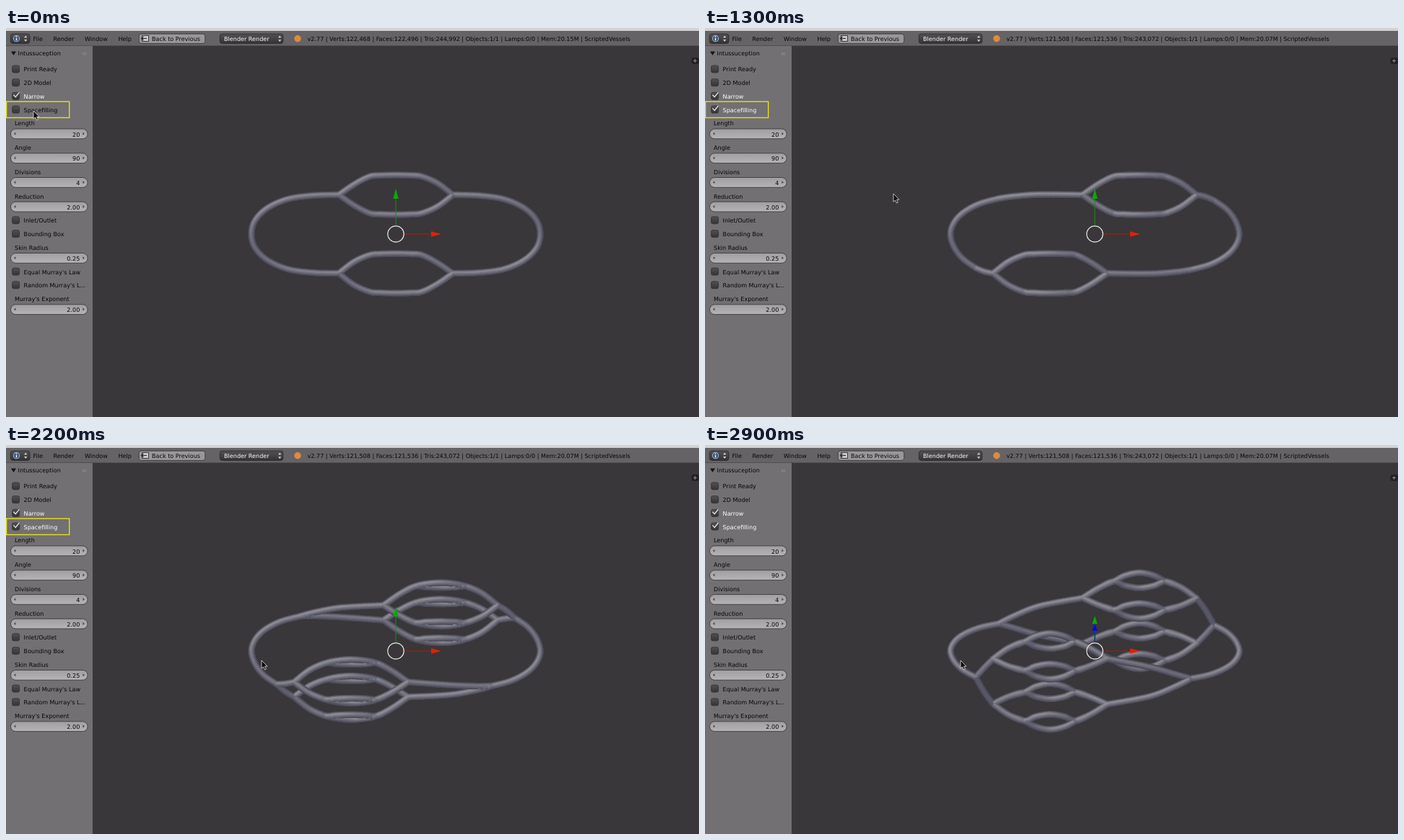
These frames come from a looping animation (960x540 px, 3 s). An HTML page with a canvas:

```html
<!DOCTYPE html>
<html lang="en">
<head>
<meta charset="utf-8">
<title>Intussuception panel</title>
<style>
  html, body { margin: 0; width: 100%; height: 100%; overflow: hidden; background: #393739; }
  canvas, svg { position: absolute; left: 0; top: 0; width: 960px; height: 540px; }
  text { font: 8.08px "DejaVu Sans", sans-serif; text-rendering: geometricPrecision; white-space: pre; }
</style>
</head>
<body>
<canvas id="view" width="960" height="540"></canvas>
<svg id="ui" viewBox="0 0 960 540">
  <defs>
    <linearGradient id="field" x2="0" y2="1"><stop stop-color="#a09ea0"/><stop offset="1" stop-color="#b5b3b5"/></linearGradient>
    <linearGradient id="dark" x2="0" y2="1"><stop stop-color="#525052"/><stop offset="1" stop-color="#353335"/></linearGradient>
  </defs>
  <rect y="25" width="120" height="515" fill="#727072"/>
  <rect width="960" height="25" fill="#656365"/>
  <rect width="960" height="4" fill="#d4d3d4"/>
  <rect y="24.3" width="960" height=".7" fill="#4a484a"/>

  <rect x="6.3" y="8.2" width="26.7" height="13.2" rx="3.2" fill="url(#dark)" stroke="#2a282a" stroke-width=".8"/>
  <circle cx="14.5" cy="14.7" r="4.6" fill="#bcc8d8"/>
  <circle cx="14.5" cy="14.7" r="3.8" fill="#3a5a82"/>
  <path d="M14.5 14v3.2M14.5 11.8v1.2" stroke="#fff" stroke-width="1.4"/>
  <path d="M25 13.6l2.2-3 2.2 3zM25 16l2.2 3 2.2-3z" fill="#ccc"/>

  <rect x="184.2" y="8.2" width="91.6" height="13.2" rx="3.2" fill="#999799" stroke="#333133" stroke-width=".8"/>
  <rect x="188.5" y="10.5" width="9" height="8" fill="#c9c9c9" stroke="#333" stroke-width=".9"/>
  <path d="M195 14.5h-7M190.5 12l-3 2.5 3 2.5" fill="none" stroke="#222" stroke-width="1.1"/>

  <rect x="296.3" y="8.2" width="87.6" height="13.2" rx="3.2" fill="url(#dark)" stroke="#2a282a" stroke-width=".8"/>
  <path d="M377 13.4l2.2-3 2.2 3zM377 16.2l2.2 3 2.2-3z" fill="#ccc"/>
  <circle cx="404" cy="14.7" r="4.7" fill="#e08a3c"/>

  <path d="M7 32.5h7l-3.5 5.4z" fill="#161616"/>
  <path d="M106 34.7h6M106 36.9h6" stroke="#a5a3a5" stroke-width="1" stroke-dasharray="1 1"/>
  <rect x="949.5" y="41" width="10.5" height="9" rx="3" fill="#232123"/>
  <path d="M952 45.5h5M954.5 43v5" stroke="#8a888a" stroke-width="1.1"/>

  <g id="rows"></g>
  <rect id="mark" x=".6" y="102.2" width="87.1" height="22.3" fill="none" stroke="#e2e01c" stroke-width="1.4"/>
  <path id="cursor" d="M0 0V11.2L2.6 9 4.5 13 6.4 12.1 4.6 8.2H8Z" fill="#0c0c0c" stroke="#e4e4e4" stroke-width=".8"/>
</svg>
<script>
const $ = id => document.getElementById(id);
const ctx = $('view').getContext('2d');

// ---------- interface ----------
function add(tag, attrs, label) {
  const el = document.createElementNS('http://www.w3.org/2000/svg', tag);
  for (const k in attrs) el.setAttribute(k, attrs[k]);
  if (label) el.textContent = label;
  return $('rows').appendChild(el);
}
const write = (x, y, label, fill = '#080808', anchor = 'start') =>
  add('text', { x, y: y + 3, fill, 'text-anchor': anchor }, label);

function checkbox(y, label, on) {
  add('rect', { x: 8.6, y: y - 5.2, width: 10, height: 10, rx: 2.2, fill: 'url(#dark)', stroke: '#333133', 'stroke-width': .8 });
  const tick = add('path', { d: `M10.4 ${y - 1.9}l2.8 3 5.2-6.4`, fill: 'none', stroke: '#e6e6e6', 'stroke-width': 1.3 });
  const text = write(24.6, y + .2, label);
  const set = v => {
    tick.style.display = v ? '' : 'none';
    text.setAttribute('fill', v ? '#fff' : '#080808');
  };
  set(on);
  return set;
}
function field(y, label, value) {
  write(12, y - 14.6, label);
  add('rect', { x: 6.5, y: y - 7, width: 106.6, height: 13.8, rx: 6.9, fill: 'url(#field)', stroke: '#353335', 'stroke-width': .8 });
  add('path', { d: `M13.4 ${y - 2.2}v4l-2.6-2zM106.4 ${y - 2.2}v4l2.6-2z`, fill: '#4c4a4c' });
  write(102.3, y + .5, value, '#080808', 'end');
}

[[37.5, 'File'], [65.5, 'Render'], [109, 'Window'], [155.5, 'Help'], [202, 'Back to Previous']]
  .forEach(([x, s]) => write(x, 15, s));
write(302, 15, 'Blender Render', '#fff');
const stats = write(417.5, 15, '');
write(16.5, 35.3, 'Intussuception');
checkbox(57.2, 'Print Ready');
checkbox(75.9, '2D Model');
checkbox(94.6, 'Narrow', true);
const setFilling = checkbox(113.3, 'Spacefilling');
field(147, 'Length', '20');
field(180.8, 'Angle', '90');
field(214.5, 'Divisions', '4');
field(248.2, 'Reduction', '2.00');
checkbox(267, 'Inlet/Outlet');
checkbox(285.8, 'Bounding Box');
field(319.5, 'Skin Radius', '0.25');
checkbox(338.3, 'Equal Murray\'s Law');
checkbox(357, 'Random Murray\'s L...');
field(390.8, 'Murray\'s Exponent', '2.00');

// ---------- vessels: points are [x, up, toward viewer] ----------
const flip = path => path.map(([x, y, z]) => [-x, -y, z]);

// One strand between fork and merge; s, q, p choose the branch at each division
const strand = (cx, s, q, p) => [
  [-79, 0, 49, 0], [-58, 16, 53, 0], [-36, 25.5, 55, 0], [-20, 27, 55, 11], [0, 27.5, 55, 16.5],
  [20, 27, 55, 11], [36, 25.5, 55, 0], [57, 15, 53, 0], [79, 0, 50, 0]
].map(([x, y, z, w]) => [cx + x, -54.5 + q * y, s * z + p * w]);

function plainNet() {
  const arc = [[-80, 54.5, 0], [-115, 53.5, 0], [-150, 48.5, 0], [-178, 36, 0], [-195, 19, 0], [-200, 0, 0]];
  const side = arc.concat(arc.slice(0, -1).reverse().map(([x, y, z]) => [x, -y, z]));
  const half = [side, strand(0, 0, 1, 0), strand(0, 0, -1, 0)];
  return half.concat(half.map(flip));
}
function filledNet() {
  const half = [[[-133, 49.5, 0], [-160, 42, 0], [-182, 30, 0], [-195, 16, 0], [-200, 0, 0],
    [-195, -18, 0], [-183, -34, 0], [-165, -47, 0]]];
  for (const s of [-1, 1]) {
    half.push([[-165, -47, 0], [-153, -52, 27 * s], [-141, -54.5, 49 * s]]);
    half.push([[17, -54.5, 50 * s], [76, -55, 32 * s], [112, -52.5, 13 * s], [133, -49.5, 0]]);
    for (const q of [-1, 1]) for (const p of [-1, 1]) half.push(strand(-62, s, q, p));
  }
  return half.concat(half.map(flip));
}

// Catmull-Rom sampling
function smooth(path, n = 10) {
  const out = [], last = path.length - 1;
  for (let i = 0; i < last; i++) {
    const [a, b, c, d] = [path[Math.max(i - 1, 0)], path[i], path[i + 1], path[Math.min(i + 2, last)]];
    for (let k = 0; k < n; k++) {
      const t = k / n;
      out.push(b.map((v, j) => v + .5 * t * (c[j] - a[j] +
        t * (2 * a[j] - 5 * v + 4 * c[j] - d[j] + t * (3 * (v - c[j]) + d[j] - a[j])))));
    }
  }
  return out.concat([path[last]]);
}
const plain = plainNet().map(p => smooth(p));
const filled = filledNet().map(p => smooth(p));

// Tube layers: width, base tone, gain from light, shift toward light.
// Wider layers sink behind by GAP each, so forks blend and crossings keep an edge.
const layers = [[9.4, 0, .08, 0], [7.6, .13, .17, .3], [5, .22, .38, 1], [2.2, .25, .62, 1.7]];
const GAP = 8;
const light = [-.42, -.68, .6];
const tone = v => `rgb(${68 + 84 * v},${67 + 84 * v},${84 + 72 * v})`;

function drawNet(net, angle) {
  const c = Math.cos(angle), s = Math.sin(angle), parts = [];
  for (const path of net) {
    const pts = path.map(([x, y, z]) => [540 + x, 286 - y * c - z * s, z * c - y * s]);
    for (let i = 1; i < pts.length; i++) {
      const a = pts[i - 1], b = pts[i], d = b.map((v, j) => v - a[j]);
      const along = d.reduce((sum, v, j) => sum + v * light[j], 0) / Math.hypot(...d);
      const lit = 1 - along * along;
      const flat = Math.hypot(d[0], d[1]) || 1, nx = -d[1] / flat, ny = d[0] / flat;
      const lean = nx * light[0] + ny * light[1];
      layers.forEach(([w, base, gain, shift], k) => parts.push({
        a, b, w, colour: tone(base + gain * lit), dx: nx * lean * shift, dy: ny * lean * shift,
        key: (a[2] + b[2]) / 2 + k * GAP
      }));
    }
  }
  parts.sort((m, n) => m.key - n.key);
  ctx.lineCap = 'round';
  for (const { a, b, w, colour, dx, dy } of parts) {
    ctx.lineWidth = w;
    ctx.strokeStyle = colour;
    ctx.beginPath();
    ctx.moveTo(a[0] + dx, a[1] + dy);
    ctx.lineTo(b[0] + dx, b[1] + dy);
    ctx.stroke();
  }
}

function axis(dx, dy, len, head, line, fill) {
  const at = (r, side) => [540 + dx * r - dy * side, 286 + dy * r + dx * side];
  ctx.lineWidth = 1.1;
  ctx.lineCap = 'butt';
  ctx.strokeStyle = line;
  ctx.beginPath();
  ctx.moveTo(...at(11, 0));
  ctx.lineTo(...at(Math.max(11, len - head), 0));
  ctx.stroke();
  ctx.fillStyle = fill;
  ctx.beginPath();
  ctx.moveTo(...at(len, 0));
  ctx.lineTo(...at(len - head, 3.7));
  ctx.lineTo(...at(len - head, -3.7));
  ctx.fill();
}
function drawGizmo(angle) {
  const c = Math.cos(angle), s = Math.sin(angle);
  axis(1, 0, 63, 14, '#b01c10', '#e0200c');
  axis(0, -1, 63 * c, 14 * c, '#188a18', '#0ca80c');
  if (s > .3) axis(0, -1, 60 * s, 10, '#1818a0', '#0808e0');
  ctx.lineWidth = 1.2;
  ctx.strokeStyle = '#e8e8e8';
  ctx.beginPath();
  ctx.arc(540, 286, 11.2, 0, 7);
  ctx.stroke();
}

// ---------- timeline ----------
const tilt = [[1800, 0], [1900, .8], [2200, 12], [2500, 24.3], [2900, 39.5]];
const pointer = [[800, 38, 115], [900, 42, 117], [1000, 60, 126], [1100, 105, 148],
  [1200, 172, 184], [1300, 261, 230], [1400, 354, 299]];

function sample(keys, t) {
  const i = keys.findIndex(k => k[0] >= t);
  if (i < 1) return (i ? keys[keys.length - 1] : keys[0]).slice(1);
  const [a, b] = [keys[i - 1], keys[i]], f = (t - a[0]) / (b[0] - a[0]);
  return a.slice(1).map((v, j) => v + (b[j + 1] - v) * f);
}

function render(t) {
  const angle = sample(tilt, t)[0] * Math.PI / 180;
  const rebuilt = t >= 200;
  ctx.fillStyle = '#393739';
  ctx.fillRect(0, 0, 960, 540);
  drawNet(rebuilt ? filled : plain, angle);
  drawGizmo(angle);
  const [verts, faces, tris, mem] = rebuilt
    ? ['121,508', '121,536', '243,072', '20.07M'] : ['122,468', '122,496', '244,992', '20.15M'];
  stats.textContent = `v2.77 | Verts:${verts} | Faces:${faces} | Tris:${tris} | Objects:1/1 | Lamps:0/0 | Mem:${mem} | ScriptedVessels`;
  setFilling(t >= 100);
  $('mark').style.display = t < 2700 ? '' : 'none';
  $('cursor').setAttribute('transform', `translate(${sample(pointer, t)})`);
}

const start = performance.now();
let shown = -1;
function tick() {
  const step = Math.floor((performance.now() - start) % 3000 / 100);
  if (step !== shown) render((shown = step) * 100);
  requestAnimationFrame(tick);
}
tick();
</script>
</body>
</html>
```
